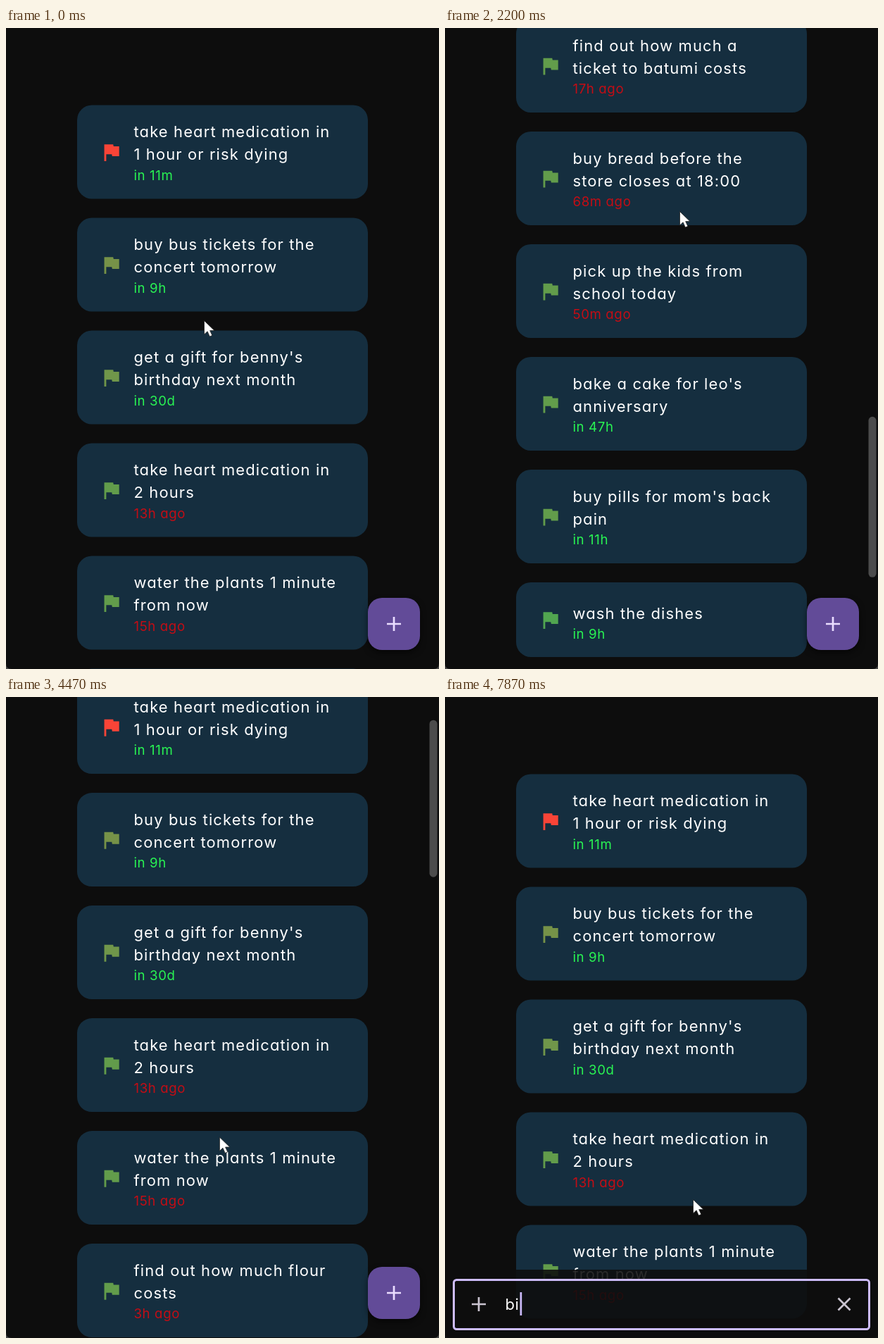
Recreate the animation shown at these times as an HTML page. Size 615 by 910 pixels, loop 8000 ms.

```html
<!DOCTYPE html>
<html lang="en">
<meta charset="utf-8">
<title>Reminders</title>
<style>
html, body { margin: 0; width: 100%; height: 100%; overflow: hidden; background: #444; }
svg { display: block; font: 400 22px Inter, "Open Sans", sans-serif; letter-spacing: 1.1px; font-feature-settings: "cv11"; fill: #fff; }
.due { font-size: 18.67px; letter-spacing: .6px; }
.icon { fill: none; stroke-width: 2.7; }
</style>
<svg width="615" height="910" viewBox="0 0 615 910">
  <path d="M0 0H615V902Q615 910 607 910H8Q0 910 0 902Z" fill="#0d0d0d"/>
  <g id="list"></g>
  <rect id="thumb" x="601.5" width="11" rx="5.5" fill="#4c4c4c"/>
  <g id="fab">
    <rect x="514" y="809" width="74" height="74" rx="20" fill="#624b98" style="filter:drop-shadow(0 4px 4px #0008)"/>
    <path class="icon" d="M541 846H561M551 836V856" stroke="#eaddff"/>
  </g>
  <g id="sheet">
    <rect y="813" width="615" height="97" fill="#0d0d0d" fill-opacity=".88"/>
    <rect x="12.5" y="827.5" width="590" height="70" rx="4" fill="none" stroke="#cdbcfb" stroke-width="3"/>
    <path class="icon" d="M38 862H58M48 852V872M558.5 853.5L575.5 870.5M575.5 853.5L558.5 870.5" stroke="#cac4d0"/>
    <text id="typed" x="85.5" y="869.5" style="letter-spacing:.6px"></text>
    <rect id="caret" y="845" width="2.7" height="33" fill="#cdbcfb"/>
  </g>
  <path id="pointer" d="M.5 .5V20L5.1 15.8 8.3 23 11.9 21.4 8.7 14.6H15Z" stroke="#222" stroke-width=".8"/>
</svg>
<script>
const $ = id => document.getElementById(id);
const LOOP = 8000, VIEW = 910;

const tasks = [
  ["take heart medication in|1 hour or risk dying", "in 11m", "#f94437"],
  ["buy bus tickets for the|concert tomorrow", "in 9h", "#769248"],
  ["get a gift for benny's|birthday next month", "in 30d", "#70964a"],
  ["take heart medication in|2 hours", "13h ago"],
  ["water the plants 1 minute|from now", "15h ago"],
  ["find out how much flour|costs", "3h ago"],
  ["buy a plane ticket to|batumi tomorrow", "16h ago"],
  ["call the dentist about|the appointment", "14h ago"],
  ["return the books to the|library today", "5h ago"],
  ["buy milk and eggs on|the way home", "2h ago"],
  ["pay the electricity bill|before friday", "4h ago"],
  ["clean the kitchen before|the guests come", "12h ago"],
  ["take out the trash this|evening", "6h ago"],
  ["find out how much a|ticket to batumi costs", "17h ago"],
  ["buy bread before the|store closes at 18:00", "68m ago"],
  ["pick up the kids from|school today", "50m ago"],
  ["bake a cake for leo's|anniversary", "in 47h"],
  ["buy pills for mom's back|pain", "in 11h"],
  ["wash the dishes", "in 9h", "#51a550"]
];

const label = (y, text, attrs = "") => `<text x="181.5" y="${y}" ${attrs}>${text}</text>`;

let cardY = 109.5;
$("list").innerHTML = tasks.map(([title, due, flag = "#629c4b"]) => {
  const lines = title.split("|"), single = lines.length == 1;
  const height = single ? 106 : 133, first = single ? 51.5 : 45.5;
  const card = `<g transform="translate(0 ${cardY})">
    <rect x="101" width="413" height="${height}" rx="21" fill="#152e3f"/>
    <path transform="translate(132.5 ${height / 2 - 16.5}) scale(1.41)" d="M14.4 6L14 4H5v17h2v-7h5.6l.4 2h7V6z" fill="${flag}"/>
    ${lines.map((line, i) => label(first + 32 * i, line)).join("")}
    ${label(single ? 79.5 : 106, due, `class="due" fill="${due.startsWith("in") ? "#29f453" : "#c30d15"}"`)}
  </g>`;
  cardY += height + 27;
  return card;
}).join("");

// Each pose: time, rest, list scroll, pointer x, pointer y
const poses = [
  [0, 200, 0, 281, 415],
  [670, 200, 0, 291, 593],
  [1400, 0, 216, 308, 323],
  [2200, 0, 2202.5, 333, 260],
  [2870, 200, 2188.5, 290, 323],
  [3730, 200, 184, 292, 498],
  [4930, 0, 56, 315, 765],
  [5200, 200, 0, 318, 800],
  [5700, 0, 0, 163, 870],
  [5930, 140, 0, 192, 890],
  [6530, 1470, 0, 352, 713]
];
const path = poses.flatMap(([t, rest, ...pose]) =>
  rest ? [[t, ...pose], [t + rest, ...pose]] : [[t, ...pose]]);

// Smooth interpolation of column c that never overshoots its keys
function track(t, c) {
  const last = path.length - 1;
  const i = path.findIndex(key => key[0] > t) - 1;
  const slope = j => (path[j + 1][c] - path[j][c]) / (path[j + 1][0] - path[j][0]);
  const tangent = j => {
    if (j == 0 || j == last) return 0;
    const a = slope(j - 1), b = slope(j);
    return a * b > 0 ? 2 * a * b / (a + b) : 0;
  };
  const h = path[i + 1][0] - path[i][0], u = (t - path[i][0]) / h, v = 1 - u;
  return path[i][c] * v * v * (1 + 2 * u) + path[i + 1][c] * u * u * (3 - 2 * u)
    + h * u * v * (tangent(i) * v - tangent(i + 1) * u);
}

const ramp = (t, from, to) => Math.min(1, Math.max(0, (t - from) / (to - from)));

function draw(now) {
  const t = now % LOOP;
  const [scroll, x, y] = [1, 2, 3].map(c => track(t, c));
  $("list").setAttribute("transform", `translate(0 ${-scroll})`);
  $("pointer").setAttribute("transform", `translate(${x} ${y})`);

  const size = scroll < 2080 ? 223 : 228;
  $("thumb").setAttribute("height", size);
  $("thumb").setAttribute("y", scroll * size / VIEW);
  $("thumb").setAttribute("opacity", ramp(t, 900, 1050) - ramp(t, 5550, 5850));

  const shown = 1 - (1 - ramp(t, 7040, 7300)) ** 3;
  $("fab").setAttribute("opacity", 1 - shown);
  $("sheet").setAttribute("transform", `translate(0 ${100 * (1 - shown)})`);
  const count = (t >= 7670) + (t >= 7865);
  $("typed").textContent = "bi".slice(0, count);
  $("caret").setAttribute("x", [86, 100.5, 106.5][count]);
}

const start = performance.now();
function tick() {
  draw(performance.now() - start);
  requestAnimationFrame(tick);
}
tick();
</script>
</html>
```
